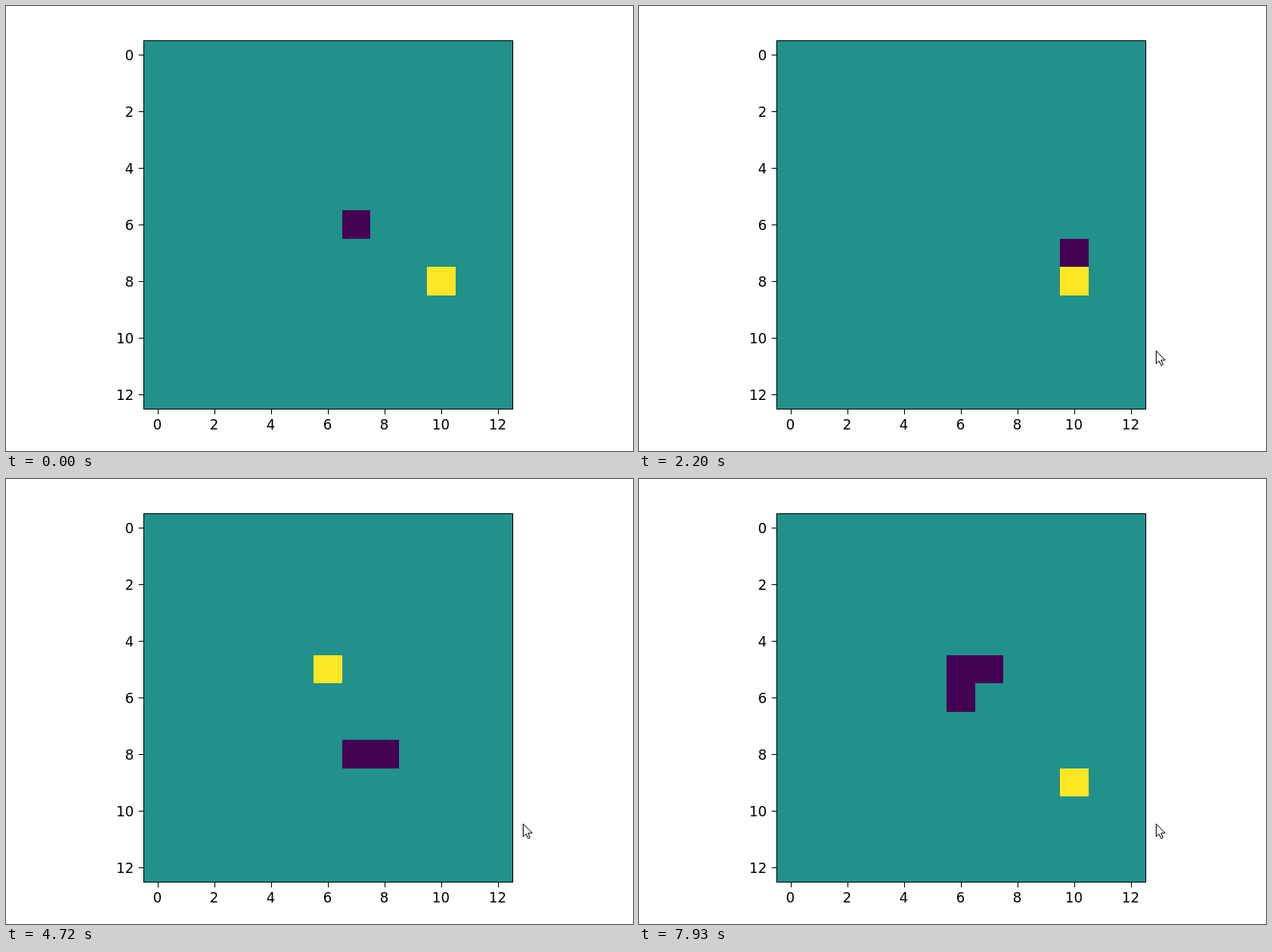
Animation of 785 by 558 pixels, one loop 8 s. Source, as an HTML page with a canvas:

```html
<!DOCTYPE html>
<html lang="en">
<head>
<meta charset="utf-8">
<title>Snake on a grid</title>
<style>
  html, body { margin: 0; width: 100%; height: 100%; overflow: hidden; background: #fff; }
  canvas { display: block; }
</style>
</head>
<body>
<canvas id="stage" width="785" height="558"></canvas>
<script>
const ctx = document.getElementById('stage').getContext('2d');
const LOOP = 8000;
const LEFT = 172, TOP = 43, SIZE = 462, CELLS = 13, CELL = SIZE / CELLS;

// The snake's head enters path[i] at stepTimes[i].
const stepTimes = [0, 350, 960, 1570, 2200, 2860, 3480, 4060, 4720, 5350, 6010, 6640, 7300, 7930];
const path = [[7, 6], [8, 6], [9, 6], [10, 6], [10, 7], [10, 8], [9, 8],
              [8, 8], [7, 8], [6, 8], [6, 7], [6, 6], [6, 5], [7, 5]];
const meals = [5, 12];
const foods = [[10, 8], [6, 5], [10, 9]];

const pointer = { start: 60, frame: 58.3, moves: 6, from: [712, 526], to: [647, 432] };
const click = { start: 410, end: 610, radius: 15 };

function fillCell([col, row], color) {
  const x = Math.round(LEFT + col * CELL), y = Math.round(TOP + row * CELL);
  ctx.fillStyle = color;
  ctx.fillRect(x, y, Math.round(LEFT + (col + 1) * CELL) - x, Math.round(TOP + (row + 1) * CELL) - y);
}

function drawAxes() {
  ctx.strokeStyle = ctx.fillStyle = '#000';
  ctx.lineWidth = 1;
  ctx.strokeRect(LEFT + 0.5, TOP + 0.5, SIZE, SIZE);
  ctx.font = '17.36px "DejaVu Sans", sans-serif';
  for (let value = 0; value < CELLS; value += 2) {
    const offset = (value + 0.5) * CELL;
    const x = Math.round(LEFT + offset), y = Math.round(TOP + offset);
    ctx.fillRect(x, TOP + SIZE + 1, 1, 6);
    ctx.fillRect(LEFT - 6, y, 6, 1);
    ctx.textAlign = 'center';
    ctx.fillText(value, x - 0.5, TOP + SIZE + 26);
    ctx.textAlign = 'right';
    ctx.fillText(value, LEFT - 12, y + 6.5);
  }
}

function drawPointer(time) {
  if (time < pointer.start) return;
  const move = Math.min(pointer.moves, Math.floor((time - pointer.start) / pointer.frame));
  const eased = 1 - (1 - move / pointer.moves) ** 2;
  const [x, y] = pointer.from.map((a, i) => Math.round(a + (pointer.to[i] - a) * eased));

  if (time >= click.start && time < click.end) {
    ctx.fillStyle = 'rgba(255, 255, 0, 0.47)';
    ctx.beginPath();
    ctx.arc(x, y, click.radius, 0, Math.PI * 2);
    ctx.fill();
  }

  ctx.save();
  ctx.translate(x + 0.5, y + 0.5);
  const arrow = new Path2D('M0 0V16L3.6 12.6 6.2 18.3 8.6 17.3 6.2 11.5H11.3Z');
  ctx.fillStyle = '#fff';
  ctx.fill(arrow);
  ctx.strokeStyle = '#000';
  ctx.stroke(arrow);
  ctx.restore();
}

function draw(now) {
  const time = now % LOOP;
  const step = stepTimes.findLastIndex(start => start <= time);
  const eaten = meals.filter(meal => meal <= step).length;

  ctx.fillStyle = '#fff';
  ctx.fillRect(0, 0, 785, 558);
  ctx.fillStyle = '#21918c';
  ctx.fillRect(LEFT, TOP, SIZE, SIZE);
  fillCell(foods[eaten], '#fde725');
  path.slice(step - eaten, step + 1).forEach(cell => fillCell(cell, '#440154'));
  drawAxes();
  drawPointer(time);
}

const startTime = performance.now();
function tick() {
  draw(performance.now() - startTime);
  requestAnimationFrame(tick);
}
tick();
</script>
</body>
</html>
```
